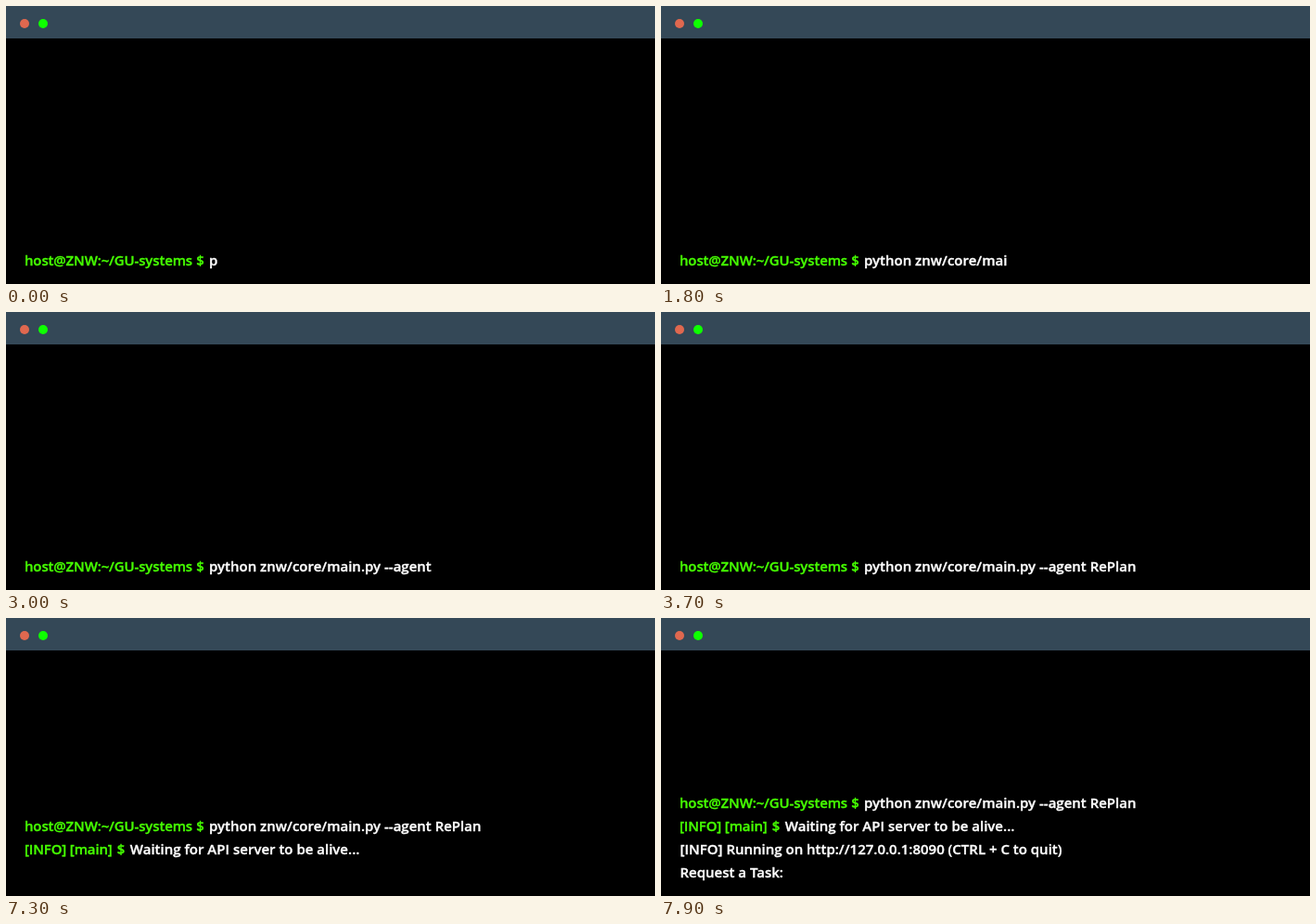
Animation, 700 px wide and 300 px high, one loop 8000 ms. Source, as an HTML page:

```html
<!DOCTYPE html>
<html lang="en">
<head>
<meta charset="utf-8">
<title>Terminal</title>
<style>
  html, body { margin: 0; width: 100%; height: 100%; overflow: hidden; background: #000; }
  svg { display: block; }
  text {
    font: 600 15px "Open Sans", "Noto Sans", sans-serif;
    color: #fff; fill: currentColor; stroke: currentColor; stroke-width: .35px;
    white-space: pre;
  }
  .prompt { color: #46ff00; letter-spacing: -.15px; }
</style>
</head>
<body>
<svg width="700" height="300" viewBox="0 0 700 300">
  <rect width="700" height="300"/>
  <rect width="700" height="35" fill="#344857"/>
  <circle cx="20" cy="19" r="5" fill="#e0684f"/>
  <circle cx="40" cy="19" r="5" fill="#0eff00"/>
  <g id="screen">
    <g class="line"><text class="prompt" x="20">host@ZNW:~/GU-systems <tspan x="205.3">$</tspan></text><text id="command" x="219"></text></g>
    <g class="line"><text class="prompt" x="20">[INFO] [main] <tspan x="119.7">$</tspan></text><text x="133.8">Waiting for API server to be alive...</text></g>
    <g class="line"><text x="20.5">[INFO] Running on http://127.0.0.1:8090 (CTRL + C to quit)</text></g>
    <g class="line"><text x="20.5">Request a Task:</text></g>
  </g>
</svg>
<script>
  const LOOP = 8000, KEY_TIME = 100, ENTER = 6900, PRINT_DELAY = 200, LINE_TIME = 400;
  const BASELINE = 280, LINE_HEIGHT = 25;
  const COMMAND = "python znw/core/main.py --agent RePlan";
  const screen = document.getElementById("screen");
  const command = document.getElementById("command");
  const lines = [...document.querySelectorAll(".line")];

  lines.forEach((line, i) => line.setAttribute("transform", `translate(0 ${i * LINE_HEIGHT})`));

  const stepsSince = (t, from) => Math.max(0, Math.floor((t - from) / LINE_TIME) + 1);

  function draw(t) {
    const typed = COMMAND.slice(0, Math.floor(t / KEY_TIME) + 1);
    if (command.textContent !== typed) command.textContent = typed;

    // Each line break scrolls the screen; the next line prints shortly after.
    const breaks = stepsSince(t, ENTER);
    const printed = stepsSince(t, ENTER + PRINT_DELAY);
    screen.setAttribute("transform", `translate(0 ${BASELINE - breaks * LINE_HEIGHT})`);
    lines.forEach((line, i) => line.setAttribute("visibility", i <= printed ? "visible" : "hidden"));
  }

  const start = performance.now();
  function tick() {
    draw((performance.now() - start) % LOOP);
    requestAnimationFrame(tick);
  }
  tick();
</script>
</body>
</html>
```
